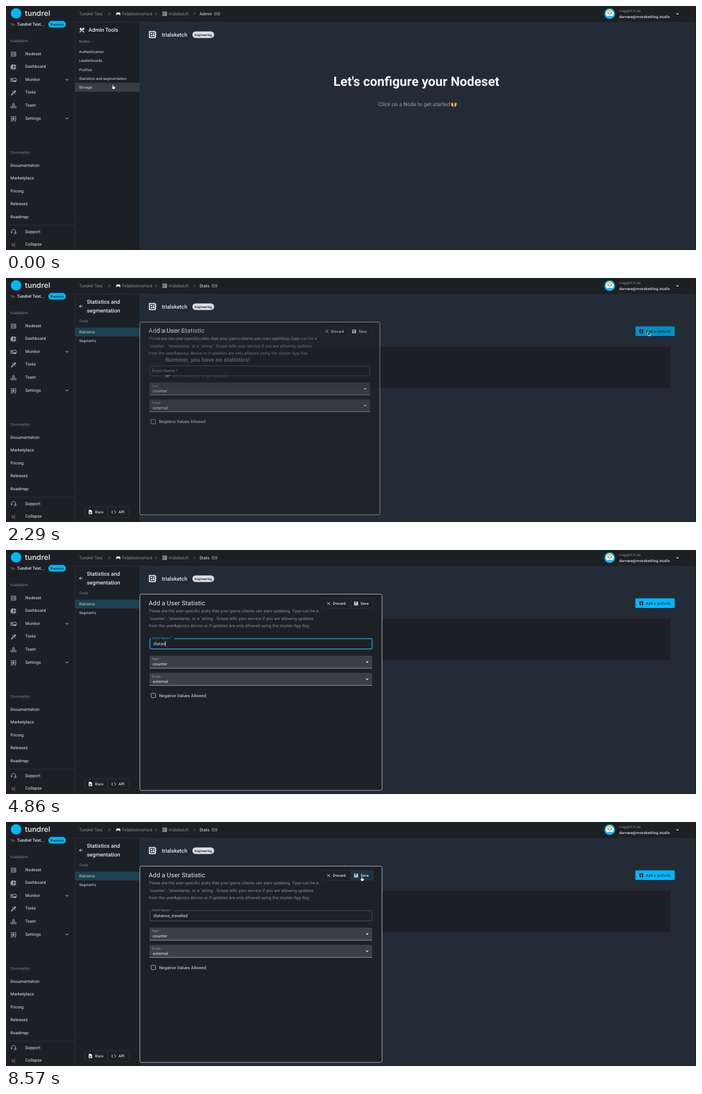
An HTML page for the animation above (8860 ms loop, 1255x446 px).

```html
<!DOCTYPE html>
<html lang="en">
<head>
<meta charset="utf-8">
<title>Add a statistic</title>
<style>
html, body { margin: 0; width: 100%; height: 100%; overflow: hidden; background: #1c2025; }
svg { display: block; width: 1255px; height: 446px; }
text { font-family: Roboto, "Liberation Sans", sans-serif; text-rendering: geometricPrecision; white-space: pre; }
.brand { font-family: Inter, Roboto, sans-serif; }
</style>
</head>
<body>
<svg id="stage" viewBox="0 0 1255 446" xmlns="http://www.w3.org/2000/svg"></svg>
<script>
const LOOP = 8860, RATE = 7;
const PANEL = '#1c2025', MAIN = '#232b36', LINE = '#2b3036', WHITE = '#e6e8ea', GRAY = '#8b8f95', CYAN = '#00b7fa';
const BODY = 7.64, SMALL = 6.55, CAP = 0.335;

// y is the middle of the capital letters
const text = (x, y, str, { size = BODY, fill = WHITE, weight = 400, anchor = 'start', gap = 0.0107, more = '' } = {}) =>
  `<text x="${x}" y="${y + CAP * size}" font-size="${size}" fill="${fill}" font-weight="${weight}" text-anchor="${anchor}" letter-spacing="${gap * size}" ${more}>${str}</text>`;
const small = (x, y, str, fill = WHITE, weight = 400) => text(x, y, str, { size: SMALL, fill, weight, gap: 0.025 });
const rect = (x, y, w, h, fill, more = '') => `<rect x="${x}" y="${y}" width="${w}" height="${h}" fill="${fill}" ${more}/>`;
const line = (d, stroke = LINE, width = 1) => `<path d="${d}" fill="none" stroke="${stroke}" stroke-width="${width}"/>`;
const shape = (d, fill = WHITE) => `<path d="${d}" fill="${fill}"/>`;
const at = (x, y, body, scale = 1) => `<g transform="translate(${x} ${y}) scale(${scale})">${body}</g>`;
const group = (id, body) => `<g id="${id}">${body}</g>`;

// Icons are centred on 0,0
const icon = {
  board: c => line('M-4 -4H3.5V4H-4Z', c, 1.2) + rect(-2.4, -2.4, 2, 2, c) + rect(0.4, -2.4, 1.8, 1.2, c) +
    rect(-2.4, 0.6, 2, 1.8, c) + rect(0.4, -0.4, 1.8, 2.8, c) + line('M4 -2.2H5.2M4 0H5.2M4 2.2H5.2', c),
  pie: c => shape('M-.5 -5A5 5 0 0 0 -.5 5ZM.5 -5A5 5 0 0 1 5 -.5H.5ZM.5 .5H5A5 5 0 0 1 .5 5Z', c),
  monitor: c => rect(-5.5, -3.5, 1.2, 7, c) + rect(-3.5, -3.5, 1.2, 7, c) + line('M-1 -3H5V3H-1Z', c, 1.1) + shape('M-.5 2L1.5 0L2.6 1L3.6 0L5 2V3H-.5Z', c),
  wand: c => line('M-4.5 4.5L1 -1', c, 2) + line('M-2 -3L3 2M1 -4.5L4.5 -1', c, 1.2) + shape('M3 -5L5 -3L2.5 -.5L.5 -2.5Z', c),
  team: c => line('M0 -4L-4 3H4Z', c) + [[0, -3.4], [-3.6, 2.8], [3.6, 2.8], [0, 1]].map(p => `<circle cx="${p[0]}" cy="${p[1]}" r="1.6" fill="${PANEL}" stroke="${c}"/>`).join(''),
  gear: c => line('M-4 -4H4V4H-4Z', c, 1.2) + `<circle r="1.6" fill="none" stroke="${c}" stroke-width="1.2"/>` + line('M0 -2.6V2.6M-2.4 -1.3L2.4 1.3M-2.4 1.3L2.4 -1.3', c, .6),
  headset: c => line('M-4 2V0A4 4 0 0 1 4 0V3.5H.5', c, 1.1) + rect(-4.8, 0, 2, 3.2, c) + rect(2.8, 0, 2, 3.2, c) + line('M-1.6 .4H-.6M.6 .4H1.6', c),
  collapse: c => line('M-.5 -2.8L-3.3 0L-.5 2.8M3.3 -2.8L.5 0L3.3 2.8', c),
  pad: c => shape('M-3 -3H3C4.6 -2 5 2 4.2 3C3.4 3.6 2.3 2 1.6 1.2H-1.6C-2.3 2 -3.4 3.6 -4.2 3C-5 2 -4.6 -2 -3 -3Z', c),
  chain: c => line('M-1 -2.2H-2.6A2.2 2.2 0 0 0 -2.6 2.2H-1M1 -2.2H2.6A2.2 2.2 0 0 1 2.6 2.2H1M-2 0H2', c, .9),
  tools: c => line('M-4 4L2 -2M4 4L-1.5 -1.5', c, 1.5) + shape('M-4.5 -2L-2 -4.5L.5 -2.5L-2.5 .3Z', c) + shape('M1.4 -1A2.6 2.6 0 0 1 3.6 -4.8L3 -3L4.8 -3.4A2.6 2.6 0 0 1 2 -.6Z', c),
  back: c => line('M3 0H-2.5M0 -2.7L-2.7 0L0 2.7', c),
  chevron: c => line('M-2.6 -1.3L0 1.3L2.6 -1.3', c),
  next: c => line('M-1.2 -2.4L1.2 0L-1.2 2.4', c, .9),
  drop: c => shape('M-2.6 -1.2H2.6L0 1.4Z', c),
  cross: c => line('M-2.7 -2.7L2.7 2.7M2.7 -2.7L-2.7 2.7', c, .9),
  disk: c => shape('M-3.5 -3.5H2L3.5 -2V3.5H-3.5Z', c) + rect(-2.5, -2.6, 3.8, 1.6, PANEL) + `<circle cy="1.2" r="1.1" fill="${PANEL}"/>`,
  doc: c => shape('M-3 -4H1L3.2 -1.8V4H-3Z', c) + line('M-1.7 .2H1.9M-1.7 2H1.9', PANEL, .8),
  code: c => line('M-1.3 -2.4L-3.8 0L-1.3 2.4M1.3 -2.4L3.8 0L1.3 2.4', c),
  plus: c => rect(-3.6, -3.6, 7.2, 7.2, c, 'rx="1"') + line('M-2 0H2M0 -2V2', CYAN)
};
const put = (name, x, y, c = WHITE, scale = 1) => at(x, y, icon[name](c), scale);

const sidebar = () => {
  const menu = [['board', 'Nodeset', 35], ['pie', 'Dashboard', 35], ['monitor', 'Monitor', 35], ['wand', 'Tools', 35], ['team', 'Team', 35], ['gear', 'Settings', 35]];
  return rect(0, 0, 125, 446, PANEL) +
    `<circle cx="18.3" cy="13.5" r="9.5" fill="${CYAN}"/>` +
    text(34.5, 13.8, 'tundrel', { size: 13.4, weight: 500, fill: '#f4f5f6', more: 'class="brand"' }) +
    small(8, 33.5, 'for', GRAY) + text(20, 33.3, 'Tundrel Test...', { weight: 500 }) +
    rect(77, 27.2, 32, 12.4, CYAN, 'rx="6.2"') + text(93, 33.6, 'Premium', { size: 5.9, weight: 500, fill: '#10202a', anchor: 'middle' }) +
    small(8, 64, 'trialsketch', GRAY) +
    menu.map(([name, label, x], i) => put(name, 13.6, 88 + i * 23.6, '#9a9da1') + text(x, 87.2 + i * 23.55, label)).join('') +
    put('chevron', 111, 134.5) + put('chevron', 111, 205.3) +
    small(8, 268, 'Community', GRAY) +
    ['Documentation', 'Marketplace', 'Pricing', 'Releases', 'Roadmap'].map((s, i) => text(8, 291.4 + i * 23.5, s)).join('') +
    line('M0 400.5H125') + put('headset', 13.6, 412.5, '#9a9da1') + text(35, 412, 'Support') +
    put('collapse', 13.6, 436.5, '#b0b3b6') + text(35, 435.5, 'Collapse') + line('M.5 0V446') + line('M125.5 0V446');
};

const avatar = () => `<circle r="9.7" fill="#12bfe6"/>` + shape('M-6.5 -4.5A8 8 0 0 1 6.5 -4.5Z', '#f4d648') +
  rect(-7, -4.3, 14, 8.6, '#f6f7f8', 'rx="3.4"') + rect(-4, -2, 2, 1.6, '#34404a') + rect(2, -2, 2, 1.6, '#34404a') + line('M-1.6 1.4H1.6', '#d8656a', 1.2);

const header = () => rect(125, 0, 1130, 30, PANEL) + line('M125 29.5H1255') +
  text(133, 14, 'Tundrel Test', { fill: GRAY }) + put('next', 188, 14.2, GRAY) +
  put('pad', 204.2, 14.2, WHITE, .85) + text(211, 14, 'Pebbleshireford', { fill: GRAY }) + put('next', 272.6, 14.2, GRAY) +
  put('board', 288.7, 14.2, '#c9ccd0', .85) + text(296, 14, 'trialsketch', { fill: GRAY }) + put('next', 342.6, 14.2, GRAY) +
  group('crumbAdmin', text(352, 14, 'Admin') + put('chain', 384, 14.3, '#c4c7ca')) +
  group('crumbStats', text(352, 14, 'Stats') + put('chain', 379.5, 14.3, '#c4c7ca')) +
  group('account', at(1098, 14, avatar()) + small(1115.5, 9.2, 'Logged in as', GRAY) +
    small(1115.5, 19.4, 'dorvane@mosskettling.studio', WHITE, 500) + put('drop', 1221.3, 14.6));

const adminPanel = () => put('tools', 138, 44) + text(150, 44, 'Admin Tools', { size: 9.75, weight: 500, gap: 0 }) +
  small(133, 64.5, 'Nodes', GRAY) + rect(126, 0, 117, 16.4, '#393c40', 'id="hoverRow"') +
  ['Authentication', 'Leaderboards', 'Profiles', 'Statistics and segmentation', 'Storage'].map((s, i) => small(133, 84 + i * 16.2, s)).join('');

const statsPanel = () => put('back', 136.2, 51.8) +
  ['Statistics and', 'segmentation'].map((s, i) => text(147, 44 + i * 15.6, s, { size: 9.83, weight: 500, gap: 0 })).join('') +
  small(133, 79.3, 'Tools', GRAY) + rect(126, 90.8, 117, 16, '#1c4150') + small(133, 99, 'Statistics') + small(133, 115, 'Segments') +
  rect(143.5, 418.5, 80, 19, 'none', `rx="2" stroke="${LINE}"`) + line('M184.5 418V437') +
  put('doc', 153.5, 427.8) + small(162, 428, 'Docs', WHITE, 500) + put('code', 195.8, 427.8) + small(205, 428, 'API', WHITE, 500);

const hands = () => [-1, 1].map(s => `<g transform="scale(${s} 1)">` + shape('M1 4V1L1.6 -3.6L2.5 -3.7L3 -1.5L4.6 -3.2L5.3 -2.6L4.6 1.2L3.4 4Z', '#f2b53c') + '</g>').join('');

const adminMain = () => text(595.6, 138.5, "Let's configure your Nodeset", { size: 23.5, weight: 700, fill: '#f2f3f4', gap: 0 }) +
  text(677.3, 180, 'Click on a Node to get started', { size: 9.83, weight: 500, fill: '#858a91', gap: 0 }) + at(814.6, 180, hands());

const statsMain = () => text(274.5, 96.2, 'Statistics', { size: 11.4 }) +
  text(274.5, 111, 'These are the user-specific stats that your game clients can start updating.', { fill: GRAY }) +
  rect(282, 125.5, 926.5, 75.5, '#1c2026', 'rx="3"') +
  text(290, 149.5, 'Bummer, you have no statistics!', { size: 10.75, weight: 700, fill: '#f2f3f4', gap: 0 }) +
  at(290, 179, shape('M0 -2H3.5L5 -2.6L5.4 -1.6H9.6V0H6V2.2L4.6 3H1L0 2Z', '#f2b53c')) +
  text(302.3, 179, 'Add a statistic to get started.', { fill: GRAY }) +
  rect(1144.7, 88.6, 71.6, 17.4, CYAN, 'rx="2" id="addButton"') + put('plus', 1155.5, 97.4, '#0a2a3a') +
  text(1164, 97.4, 'Add a statistic', { size: SMALL, weight: 500, fill: '#0a2a3a', gap: .0286 });

const select = (y, label, value) => rect(261, y, 405, 23.5, '#3b4047', 'rx="2"') + line(`M261 ${y + 23.1}H666`, '#b4b7bb', .8) +
  text(265, y + 6.2, label, { size: 5.8, fill: '#989ca2' }) + text(267, y + 15.8, value) + put('drop', 657, y + 12);

const dialog = () => rect(243.5, 80.7, 440.5, 358.6, '#1d2126', 'rx="2.5" stroke="#b9bcbf"') +
  text(259.5, 97, 'Add a User Statistic', { size: 11.5, gap: .01 }) +
  ['These are the user-specific stats that your game clients can start updating. Type can be a',
    '`counter`, `timestamp` or a `string`. Scope tells your service if you are allowing updates',
    'from the user&amp;apos;s device or if updates are only allowed using the cluster App Key.']
    .map((s, i) => text(259.5, 111.3 + i * 13.7, s, { fill: GRAY })).join('') +
  rect(627, 88.8, 41, 17.4, '#1d3442', 'id="saveHover"') +
  rect(575.5, 88.5, 92.5, 18, 'none', `rx="2" stroke="${LINE}"`) + line('M627.5 88.5V106.5') +
  put('cross', 586.7, 97.8) + small(594.5, 98, 'Discard', WHITE, 500) + put('disk', 636.7, 97.8) + small(645, 98, 'Save', WHITE, 500) +
  rect(261.8, 162, 403.9, 18.7, 'none', 'rx="2" id="field"') + rect(264, 159, 42, 5, '#1d2126', 'id="notch"') +
  text(0, 0, 'Event Name *', { more: 'id="label"' }) + text(268, 171.4, '', { more: 'id="value"' }) +
  rect(0, 166.8, .9, 9.4, '#fff', 'id="caret"') +
  select(193, 'Type', 'counter') + select(224.4, 'Scope', 'external') +
  rect(264, 262, 8, 8, 'none', 'rx="1" stroke="#b4b7bb"') + text(278.5, 266, 'Negative Values Allowed');

const pointers = {
  arrow: '<path d="M0 0V7.4L1.8 5.8L3 8.4L4.2 7.9L3.1 5.4H5.4Z" fill="#111" stroke="#fff" stroke-width=".8"/>',
  hand: '<path d="M-.9 .7Q0 -.6 .9 .7V3.2L3.6 4Q4.4 4.4 4.1 5.8L3.4 8.6H-.4L-2.6 5.4Q-2.6 4.2 -.9 5Z" fill="#fff" stroke="#111" stroke-width=".6"/>',
  beam: '<path d="M-1.8 -4.2Q0 -4.2 0 -3V3Q0 4.2 -1.8 4.2M1.8 -4.2Q0 -4.2 0 -3V3Q0 4.2 1.8 4.2M-1 1.4H1" fill="none" stroke="#e8e8e8" stroke-width=".9"/>'
};

document.getElementById('stage').innerHTML =
  rect(0, 0, 1255, 446, MAIN) + rect(125, 0, 118, 446, PANEL) + sidebar() + header() + line('M243.5 30V446') +
  line('M1254.5 0V446M243 445.5H1255', '#171b20') +
  put('board', 266.4, 52.3, '#f0f1f2', 1.4) + text(283.5, 52.6, 'trialsketch', { size: 9.83, weight: 500, gap: 0 }) +
  rect(339, 46.4, 39.6, 12.2, '#dcdfe2', 'rx="6.1"') + text(358.8, 52.6, 'Engineering', { size: 6, weight: 500, fill: '#22272d', anchor: 'middle', gap: 0 }) +
  group('adminPage', adminPanel() + adminMain()) + group('statsPage', statsPanel() + statsMain()) +
  group('scrollbar', rect(1247.5, 0, 7.5, 446, '#2b2d2f') + rect(1249, 1, 4.6, 426, '#6a6c6e', 'rx="2.3"')) +
  group('dialog', dialog()) +
  group('pointer', Object.entries(pointers).map(([name, body]) => group(name, body)).join(''));

const el = {};
document.querySelectorAll('#stage [id]').forEach(node => { el[node.id] = node; });
const show = (node, on) => node.setAttribute('display', on ? 'inline' : 'none');
const set = (node, attrs) => { for (const key in attrs) node.setAttribute(key, attrs[key]); };

// Times below are in ticks of 1/7 s
const path = [[0, 194.5, 143.5], [2, 190, 130], [8, 190, 130], [12, 1213, 94.5], [14, 1167.5, 98], [16, 1167.5, 98],
  [20, 522, 159], [21, 500.5, 167.3], [51, 500.5, 167.3], [56, 647, 99.5]];
const looks = [[0, 'hand'], [9, 'arrow'], [12, 'hand'], [14, 'arrow'], [21, 'beam'], [27, ''], [51, 'beam'], [53, 'arrow'], [56, 'hand']];
const word = 'distance_travelled';
const keys = [27, 28, 30, 31, 33, 34, 35, 36, 38, 41, 42, 43, 44, 45, 46, 47, 48, 49];

function pointerAt(k) {
  const i = path.findIndex(p => p[0] > k);
  if (i < 0) return path[path.length - 1].slice(1);
  const [a, b] = [path[i - 1], path[i]];
  const u = (k - a[0]) / (b[0] - a[0]), e = u * u * (3 - 2 * u);
  return [a[1] + (b[1] - a[1]) * e, a[2] + (b[2] - a[2]) * e];
}

function draw(ms) {
  const k = Math.floor((ms % LOOP + 5) * RATE / 1000);
  const stats = k >= 5, scroll = stats && k < 16, focused = k >= 24 && k < 58, floated = k >= 24;

  show(el.adminPage, !stats); show(el.crumbAdmin, !stats);
  show(el.statsPage, stats); show(el.crumbStats, stats);
  show(el.scrollbar, scroll);
  set(el.account, { transform: `translate(${scroll ? -7.3 : 0} 0)` });
  set(el.hoverRow, { y: k < 1 ? 140.4 : 124.2 });
  set(el.addButton, { fill: k >= 13 && k <= 16 ? '#068fc2' : CYAN });

  const grow = k === 16 ? 0.991 : 1;
  show(el.dialog, k >= 16);
  set(el.dialog, { opacity: k === 16 ? 0.72 : 1, transform: `translate(243 80) scale(${grow} ${grow * grow}) translate(-243 -80)` });

  set(el.field, { stroke: focused ? '#1aa5e2' : '#565a5f', 'stroke-width': focused ? 1.5 : 1 });
  show(el.notch, floated);
  const size = floated ? 5.7 : BODY;
  set(el.label, { x: 266, y: (floated ? 161.4 : 171.4) + CAP * size, 'font-size': size, 'letter-spacing': 0.0107 * size,
    fill: focused ? '#1aa5e2' : GRAY });
  el.value.textContent = word.slice(0, keys.filter(t => t <= k).length);
  show(el.caret, focused);
  set(el.caret, { x: 268 + (el.value.textContent ? el.value.getComputedTextLength() : 0) });

  show(el.saveHover, k >= 56);
  set(el.saveHover, { fill: k === 59 ? '#21414f' : '#1d3442' });

  const look = looks.filter(l => l[0] <= k).pop()[1];
  for (const name in pointers) show(el[name], name === look);
  set(el.pointer, { transform: `translate(${pointerAt(k).join(' ')})` });
}

const start = performance.now();
(function tick() {
  draw(performance.now() - start);
  requestAnimationFrame(tick);
})();
</script>
</body>
</html>
```
